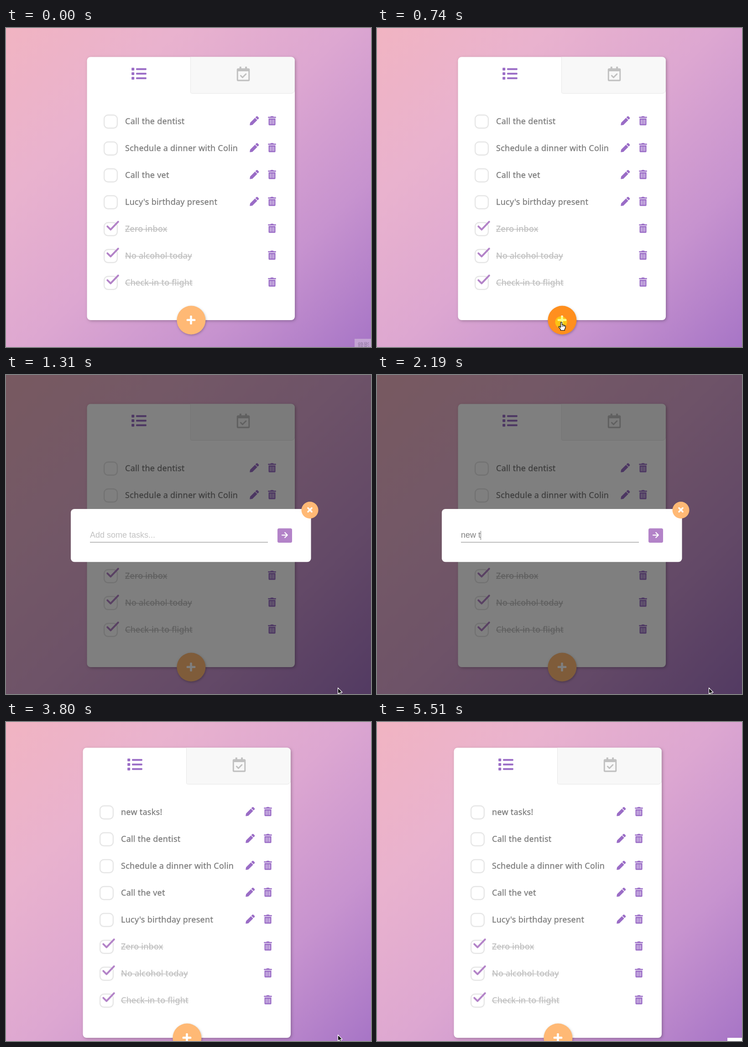
An HTML page with a canvas for the animation above (5.55 s loop, 800 px wide and 700 px high).

```html
<!DOCTYPE html>
<html lang="en">
<head>
<meta charset="utf-8">
<title>To-do list</title>
<style>
html, body { margin: 0; width: 100%; height: 100%; overflow: hidden; }
canvas { display: block; }
</style>
</head>
<body>
<canvas id="stage" width="800" height="700"></canvas>
<script>
const ctx = document.getElementById('stage').getContext('2d');
const LOOP = 5550, OPEN = 770, SAVED = 3800;
const PURPLE = '#9a6cc6', LILAC = '#b383c8', GREY = '#c1c1c1';
const PEACH = [255, 185, 117], ORANGE = [255, 143, 30];
const TASK_FONT = '500 18px "Noto Sans", "Open Sans", sans-serif';
const INPUT_FONT = '18px "Liberation Sans", Arial, sans-serif';

const TODO = ['Call the dentist', 'Schedule a dinner with Colin', 'Call the vet', "Lucy's birthday present"];
const DONE = ['Zero inbox', 'No alcohol today', 'Check-in to flight'];
const NEW_TASK = 'new tasks!';
const KEY_TIMES = [1620, 1710, 1800, 1890, 2190, 2540, 2770, 2910, 3000, 3360];

const PENCIL = new Path2D('M498 142l-46 46c-5 5-12 5-17 0l-111-111c-5-5-5-12 0-17l46-46c19-19 49-19 68 0l60 60c19 19 19 49 0 68z' +
  'M284 100L22 362 0 484c-3 16 11 31 28 28l122-22 262-262c5-5 5-12 0-17l-111-111c-5-5-12-5-17 0z');
const TRASH = new Path2D('M32 464a48 48 0 0 0 48 48h288a48 48 0 0 0 48-48V128H32z' +
  [304, 208, 112].map(x => `M${x} 208a16 16 0 0 1 32 0v224a16 16 0 0 1-32 0z`).join('') +
  'M432 32H312l-9-19A24 24 0 0 0 281 0H167a24 24 0 0 0-22 13L136 32H16A16 16 0 0 0 0 48v32a16 16 0 0 0 16 16h416a16 16 0 0 0 16-16V48a16 16 0 0 0-16-16z');
const ARROW = new Path2D('M0 0V13.5L3.1 10.7 5.4 16 7.7 15 5.4 9.8H9.6Z');
const HAND = new Path2D('M-1.5 1C-1.5-.6 1.5-.6 1.5 1V6C2.5 5 4 5.4 4 6.8 5 5.9 6.6 6.4 6.6 7.8 7.6 7 9 7.5 9 8.8V12.5L7.4 15.5V18H-1.6V16L-5.6 10.8C-6.2 9.3-4.2 8.6-3.2 9.8L-1.5 11.5Z');

const backdrop = ctx.createLinearGradient(25, -25, 775, 725);
['#f1b4c2', '#e9b2ce', '#dda7d1', '#c793cf', '#a775c6'].forEach((c, i) => backdrop.addColorStop(i / 4, c));

const clamp = v => Math.min(1, Math.max(0, v));
const ramp = (t, from, to) => clamp((t - from) / (to - from));
const ease = k => k * k * (3 - 2 * k);
const mix = (a, b, k) => a + (b - a) * k;
const blend = (a, b, k) => `rgb(${a.map((v, i) => Math.round(mix(v, b[i], k))).join()})`;

function box(x, y, w, h, r, fill) {
  ctx.beginPath();
  ctx.roundRect(x, y, w, h, r);
  if (fill) {
    ctx.fillStyle = fill;
    ctx.fill();
  }
}

function disc(x, y, r, fill) {
  ctx.beginPath();
  ctx.arc(x, y, r, 0, Math.PI * 2);
  ctx.fillStyle = fill;
  ctx.fill();
}

function line(points, color, width) {
  ctx.beginPath();
  points.forEach(([x, y]) => ctx.lineTo(x, y));
  ctx.strokeStyle = color;
  ctx.lineWidth = width;
  ctx.lineCap = ctx.lineJoin = 'round';
  ctx.stroke();
}

function icon(path, x, y, size, color) {
  ctx.save();
  ctx.translate(x, y);
  ctx.scale(size / 512, size / 512);
  ctx.fillStyle = color;
  ctx.fill(path);
  ctx.restore();
}

function shadow(draw, dx, dy, blur) {
  ctx.save();
  ctx.shadowColor = 'rgba(0,0,0,.25)';
  ctx.shadowOffsetX = dx;
  ctx.shadowOffsetY = dy;
  ctx.shadowBlur = blur;
  draw();
  ctx.restore();
}

function drawTabs(width) {
  ctx.save();
  box(0, 0, width, 200, 8);
  ctx.clip();
  box(227, -10, 228.5, 90, [0, 0, 8, 3], '#f8f8f8');
  ctx.strokeStyle = '#e7e7e7';
  ctx.lineWidth = 1;
  ctx.stroke();
  ctx.restore();

  for (const y of [23.7, 33.7, 43.7]) {
    box(97.7, y, 6, 6, 1, PURPLE);
    box(107.7, y + 1, 22.5, 4, 1, PURPLE);
  }

  box(328.3, 25, 28.5, 28.3, 3, GREY);
  box(331.3, 31.5, 22.5, 18.6, 0.5, '#f8f8f8');
  box(334.3, 21.2, 4, 6, 1, GREY);
  box(346.6, 21.2, 4, 6, 1, GREY);
  line([[336.9, 41], [340.9, 45], [348.4, 37.5]], GREY, 3);
}

function drawTask(label, y, done) {
  box(37.6, y - 14, 28.8, 28.8, 8.5);
  ctx.strokeStyle = '#e6e6e6';
  ctx.lineWidth = 2.4;
  ctx.stroke();

  ctx.save();
  ctx.font = TASK_FONT;
  ctx.letterSpacing = '0.25px';
  ctx.fillStyle = ctx.strokeStyle = done ? '#bfbfbf' : '#7b7b7b';
  ctx.lineWidth = 0.3;
  ctx.fillText(label, 83.5, y + 6);
  ctx.strokeText(label, 83.5, y + 6);
  if (done) ctx.fillRect(83.5, y + 0.2, ctx.measureText(label).width, 1.4);
  ctx.restore();

  if (done) {
    line([[44.8, y - 5.6], [51.8, y + 1.3], [68.3, y - 15.8]], LILAC, 4);
  } else {
    icon(PENCIL, 356.8, y - 11.5, 20, PURPLE);
  }
  icon(TRASH, 396.8, y - 11.5, 20, PURPLE);
}

function drawCard(x, y, todo, button) {
  const width = 455.5, height = 164.5 + 59 * (todo.length + DONE.length);
  ctx.save();
  ctx.translate(x, y);
  shadow(() => box(0, 0, width, height, 8, '#fff'), 2, 2, 6);
  drawTabs(width);
  [...todo, ...DONE].forEach((label, i) => drawTask(label, 141.5 + 59 * i, i >= todo.length));
  shadow(() => disc(228.4, height, 31.5, button), 1, 2, 5);
  box(218.2, height - 2.5, 19.6, 4.6, 1.5, '#fff');
  box(225.7, height - 10, 4.6, 19.6, 1.5, '#fff');
  ctx.restore();
}

function drawDialog(t) {
  ctx.fillStyle = 'rgba(0,0,0,.5)';
  ctx.fillRect(0, 0, 800, 700);
  box(142, 294, 526.5, 116.3, 8, '#fff');

  const typed = NEW_TASK.slice(0, KEY_TIMES.filter(k => t >= k).length);
  ctx.font = INPUT_FONT;
  ctx.fillStyle = typed ? '#808080' : '#c2c2c2';
  ctx.fillText(typed || 'Add some tasks...', 184, 357);
  ctx.fillStyle = '#bdbdbd';
  ctx.fillRect(184, 366, 390, 2);
  if (typed || t < 1310) {
    ctx.fillStyle = '#777';
    ctx.fillRect(184 + Math.round(ctx.measureText(typed).width), 342, 1, 20);
  }

  box(595, 336.5, 32, 31.5, 3.5, LILAC);
  line([[605, 351.3], [616, 351.3]], '#fff', 2.3);
  line([[611.3, 345.8], [616.8, 351.3], [611.3, 356.8]], '#fff', 2.3);

  disc(666, 296.5, 18.5, 'rgb(255,185,117)');
  line([[662, 292], [670, 300]], '#fff', 3.6);
  line([[670, 292], [662, 300]], '#fff', 3.6);
}

function pointerAt(t) {
  const k = t < OPEN ? ease(ramp(t, 30, 560)) : 1 - ease(ramp(t, OPEN, 1140));
  return t < OPEN
    ? [mix(730, 404, k), mix(704, 645.5, k)]
    : [mix(727.5, 404, k), mix(686.5, 645.5, k)];
}

function drawPointer(t) {
  if (t >= 4900) return;
  const [x, y] = pointerAt(t);
  const hand = t < OPEN && Math.hypot(x - 406, y - 641) < 31.5;
  if (t >= 620 && t < OPEN) disc(403.5, 645.5, 13, 'rgba(250,250,10,.5)');
  ctx.save();
  ctx.translate(x, y);
  if (t >= 4870) ctx.globalAlpha = 0.5;
  ctx.lineJoin = 'round';
  ctx.lineWidth = 1.2;
  ctx.fillStyle = hand ? '#fff' : '#000';
  ctx.strokeStyle = hand ? '#000' : '#fff';
  ctx.fill(hand ? HAND : ARROW);
  ctx.stroke(hand ? HAND : ARROW);
  if (hand) {
    for (const dx of [1.5, 4, 6.6]) line([[dx, 7.5], [dx, 10]], '#000', 0.8);
  }
  ctx.restore();
}

function drawCorner(t) {
  const fade = 1 - ramp(t, 30, 150);
  if (fade > 0) {
    ctx.save();
    ctx.globalAlpha = fade;
    ctx.fillStyle = '#c3a3d3';
    ctx.fillRect(764, 682, 36, 18);
    ctx.font = '13px "Noto Sans CJK TC", "Noto Sans CJK", sans-serif';
    ctx.fillStyle = '#9279a2';
    ctx.fillText('錄影', 771, 700);
    ctx.restore();
  }
  if (t >= 5410) {
    ctx.fillStyle = `rgba(255,255,255,${mix(0.35, 1, ramp(t, 5410, 5510))})`;
    ctx.fillRect(768, 693, 32, 7);
  }
}

function render(t) {
  ctx.fillStyle = backdrop;
  ctx.fillRect(0, 0, 800, 700);
  if (t < SAVED) {
    const hover = ramp(t, 400, 600) * (1 - ramp(t, 800, 1100));
    drawCard(177.5, 63.5, TODO, blend(PEACH, ORANGE, hover));
    if (t >= OPEN) drawDialog(t);
  } else {
    drawCard(168.5, 56.5, [NEW_TASK, ...TODO], blend(PEACH, ORANGE, 0));
  }
  drawCorner(t);
  drawPointer(t);
}

const start = performance.now();
function tick() {
  render((performance.now() - start) % LOOP);
  requestAnimationFrame(tick);
}
tick();
</script>
</body>
</html>
```
